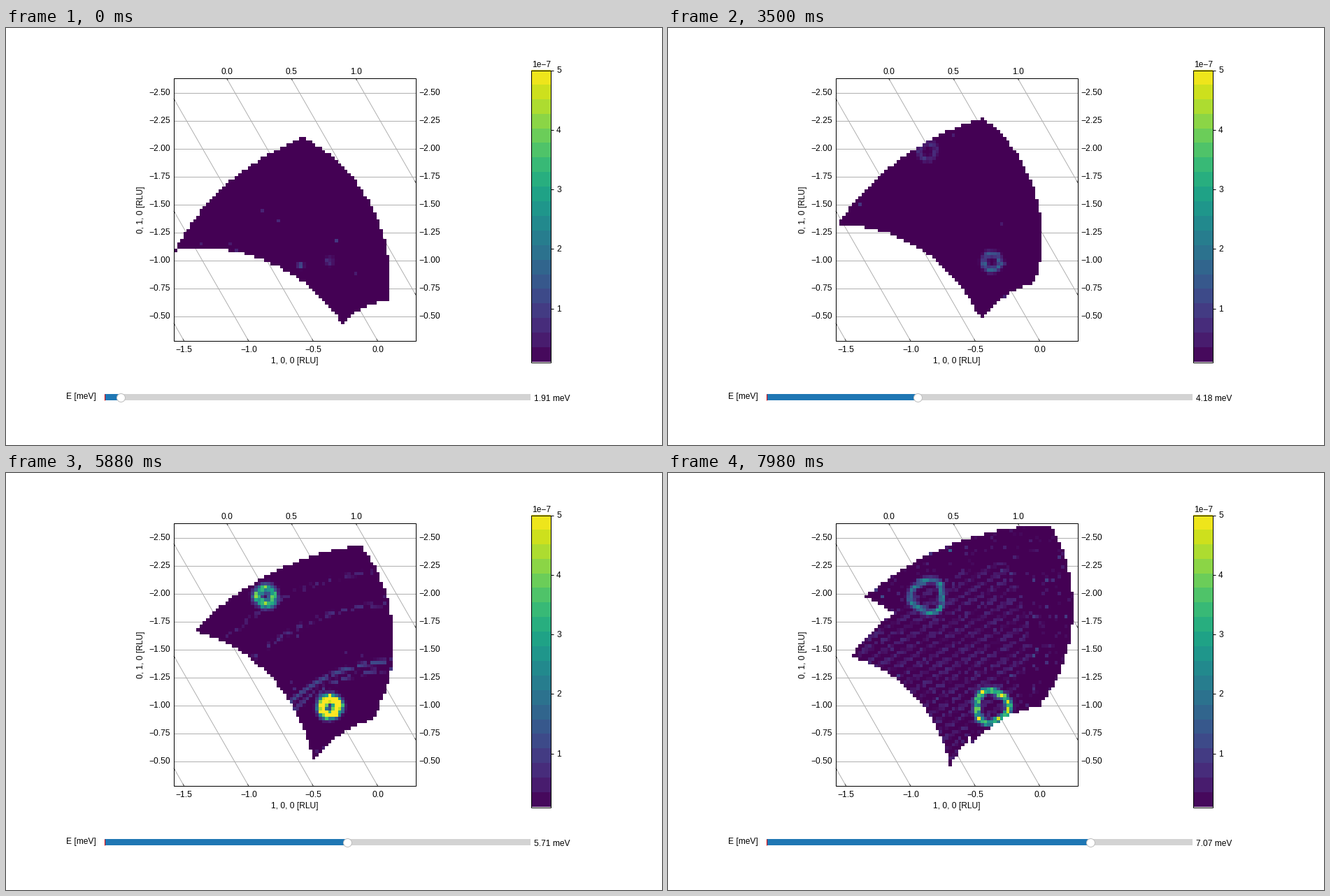
Write a matplotlib script that moves like this. It is 938x597 px and loops after 8000 ms.

```python
import numpy as np
import matplotlib.pyplot as plt
from matplotlib.animation import FuncAnimation
from matplotlib.collections import LineCollection
from matplotlib.patches import Rectangle

W, H, DPI = 938, 597, 64
PT = 72 / DPI                      # points per pixel
TICK_MS, HOLD, LOOP_MS = 20, 7, 8000
FRAMES = LOOP_MS // TICK_MS
STEPS = (FRAMES - 1) // HOLD + 1

plt.rcParams["font.family"] = "Liberation Sans"
fig = plt.figure(figsize=(W / DPI, H / DPI), dpi=DPI, facecolor="white")
ax = fig.add_axes([0, 0, 1, 1])
ax.axis("off")

# Plot box, bins and the position of Q = 0, all in pixels
LEFT, RIGHT, TOP, BOTTOM = 240, 586, 72, 448
COLS, ROWS, DX, DY, Y0 = 75, 80, 4.6, 4.71, 71.3
OX, OY = 557, 492.5
X, Y = np.meshgrid(LEFT + DX * (np.arange(COLS) + 0.5),
                   Y0 + DY * (np.arange(ROWS) + 0.5))
R = np.hypot(X - OX, Y - OY)
PHI = np.degrees(np.arctan2(OY - Y, X - OX))

K2 = 11298                         # squared wave number per meV
EF_MIN, EF_MAX = 3.1, 5.04         # analysed energies
SPAN, TILT = 40, 2                 # sample rotation in degrees
WIDE, SHIFTED = (-0.02, 0.929), (0.085, 0.952)   # cosines of detector limits
# incident energy, first rotation angle, detector limits, signal strength
SCANS = [(6.6, 151, WIDE, 0.8), (8.3, 141, WIDE, 1.8),
         (10.2, 132.2, SHIFTED, 5), (11.9, 125.2, SHIFTED, 4)]
POWDER = [(223, 1.2), (211, 0.9), (305, 0.75), (352, 0.6)]


def energy(step):
    return 1.913 + 0.0905 * step


def coverage(scan, e):
    """Bins reached by one scan: a scattering arc swept by sample rotation."""
    ei, start, limits, _ = scan
    if not EF_MIN < ei - e < EF_MAX:
        return np.zeros_like(R, bool)
    ki2, kf2 = K2 * ei, K2 * (ei - e)
    r_out, r_in = (np.sqrt(ki2 + kf2 - 2 * np.sqrt(ki2 * kf2) * c)
                   for c in limits)
    cos = (ki2 + R**2 - kf2) / (2 * np.sqrt(ki2) * R)
    psi = PHI + np.degrees(np.arccos(np.clip(cos, -1, 1)))
    end = start + SPAN + TILT * (r_out - R) / (r_out - r_in)
    return (R > r_in - 1) & (R < r_out + 0.5) & (psi > start) & (psi < end)


def ring(cx, cy, radius, width, peak, warp=0):
    dx, dy = X - cx, Y - cy
    radius = radius * (1 + warp * np.cos(3 * np.arctan2(dy, dx)))
    return peak * np.exp(-((np.hypot(dx, dy) - radius) / width) ** 2)


def intensity(step):
    rng = np.random.default_rng(step)
    e = energy(step)
    masks = [coverage(s, e) for s in SCANS]
    hit = np.sum(masks, axis=0)
    active = [(s, m) for s, m in zip(SCANS, masks) if m.any()]

    # Rings widen with energy and blur where the analysed energy is high
    ei, *_, gain = max((s for s, _ in active), key=lambda s: s[-1])
    ef = ei - e
    blur = min(10, gain**2 * ((ef - EF_MIN) / (EF_MAX - EF_MIN)) ** 3)
    radius = 3 + 0.35 * step - 0.7 * blur
    width = 4.8 + 0.2 * blur
    peak = gain * (0.8 + 0.07 * blur)
    warp = 0.0015 * step
    z = ring(463, 334.5, radius, width, peak, warp)
    z += ring(371, 176.5, radius, width, peak / 2, -warp)
    z *= rng.uniform(0.6, 1.3, z.shape)

    if active[0][0] is SCANS[0]:   # drifting spurious spot
        z += ring(421 - 2.4 * step, 340, 0, 4.5, 1.5)

    fade = gain / 5 * np.exp(-((ef - 4.486) / 0.11) ** 2)
    for r, strength in POWDER:
        lit = rng.random(z.shape) < 0.75 * strength
        z += lit * fade * strength * np.exp(-((R - r) / 3.5) ** 2)

    for (ei, *_), mask in active:
        ef = ei - e
        if ef > 4.75:              # speckle at the detector's upper edge
            lit = mask & (hit == 1) & (rng.random(z.shape) < 0.12)
            z += lit * 6 * (ef - 4.75) * (0.4 + rng.exponential(0.4, z.shape))
        if ef < 3.2:               # binning stripes
            wave = np.sin((0.5 * X + 0.87 * Y) / 2.2) > -0.1
            z += mask * wave * rng.uniform(0.1, 0.65, z.shape)

    z += (rng.random(z.shape) < 0.003) * rng.uniform(0.4, 0.9, z.shape)
    return np.where(hit > 0, z, np.nan)


def label(x, y, s, ha="center", **kw):
    return ax.text(x, y, s, ha=ha, va="baseline", fontsize=12 * PT, **kw)


def lines(segments, color, width=1, z=1):
    ax.add_collection(LineCollection(segments, colors=color,
                                     linewidths=width * PT, zorder=z))


def box(x0, y0, x1, y1, z=4, **kw):
    patch = Rectangle((x0, y0), x1 - x0, y1 - y0, zorder=z, **kw)
    return ax.add_patch(patch)


def picture(data, x0, y0, x1, y1, **kw):
    return ax.imshow(data, extent=(x0, x1, y1, y0), aspect="auto",
                     interpolation="nearest", zorder=2, **kw)


def number(v, digits):
    return f"{v:.{digits}f}".replace("-", "\u2212")


# Grid and tick labels
grid, ends = [], []
for i in range(9):
    y = 93 + 40 * i
    grid.append([(LEFT, y), (RIGHT, y)])
    text = number(-2.5 + 0.25 * i, 2)
    label(235, y + 3.5, text, "right")
    label(590, y + 3.5, text, "left")

slope = 216 / (BOTTOM - TOP)
for i in range(6):
    h = -1.5 + 0.5 * i
    foot = 531.5 + 184.6 * h
    head = foot - slope * (BOTTOM - TOP)
    x0, x1 = max(head, LEFT), min(foot, RIGHT)
    y0, y1 = TOP + (x0 - head) / slope, BOTTOM - (foot - x1) / slope
    grid.append([(x0, y0), (x1, y1)])
    ends += [[(x0, y0), (x0 + 1.7, y0 + 3)], [(x1, y1), (x1 - 1.7, y1 - 3)]]
    if foot < RIGHT:
        label(foot, 463.5, number(h, 1))
    if head > LEFT:
        label(head, 66, number(h, 1))
lines(grid, "#b0b0b0")
lines(ends, "#555555")
label(413, 480, "1, 0, 0 [RLU]")
label(196, 260, "0, 1, 0 [RLU]", rotation=90, rotation_mode="anchor")

# Map
viridis = plt.get_cmap("viridis")
maps = [intensity(s) for s in range(STEPS)]
image = picture(maps[0], LEFT, Y0, LEFT + DX * COLS, Y0 + DY * ROWS,
                cmap=viridis, vmin=0.1, vmax=5)
box(LEFT, TOP, RIGHT, BOTTOM, fill=False, ec="black", lw=PT)

# Colour bar
BAR = (750.5, 60.5, 778.5, 478.5)
bands = (np.arange(20)[::-1, None] + 0.5) / 20
picture(viridis(bands), *BAR)
box(*BAR, fill=False, ec="black", lw=PT)
for v in range(1, 6):
    y = 60.5 + (5 - v) * 85.3
    lines([[(779, y), (783, y)]], "black", z=4)
    label(787, y + 4, str(v), "left")
label(752, 56, "1e\u22127", "left")

# Slider
SX = 141
label(129, 531.5, "E [meV]", "right")
box(SX, 524, 750, 533, fc="#d3d3d3", lw=0)
fill = box(SX, 524, 164, 533, fc="#1f77b4", lw=0)
lines([[(SX + 0.3, 524), (SX + 0.3, 533)]], "red", 1, 5)
knob, = ax.plot([164], [529], "o", ms=12 * PT, mfc="white", mec="0.75",
                mew=PT, zorder=6)
value = label(755, 534, "", "left")
ax.set_xlim(0, W)
ax.set_ylim(H, 0)


def update(i):
    step = i // HOLD
    x = 163.7 + 7.72 * step
    image.set_data(maps[step])
    fill.set_width(x - SX)
    knob.set_data([x], [529])
    value.set_text(f"{energy(step):.2f} meV")
    return image, fill, knob, value


anim = FuncAnimation(fig, update, frames=FRAMES, interval=TICK_MS,
                     repeat=True, repeat_delay=0)
plt.show()
```
